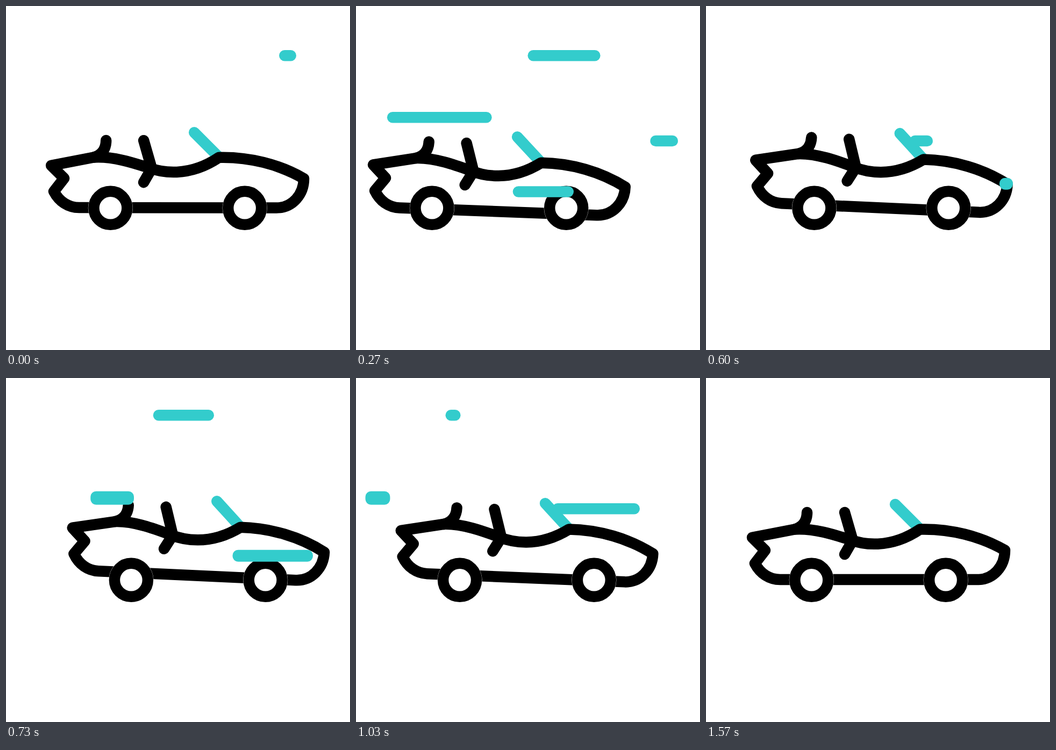
An HTML page for the animation above (1.67 s loop, 640 px wide and 640 px high).

```html
<!DOCTYPE html>
<html lang="en">
<head>
<meta charset="utf-8">
<title>Convertible</title>
<style>
  html, body { margin: 0; height: 100%; overflow: hidden; background: #fff; }
  svg { display: block; width: 100vw; height: 100vh; }
  path, circle { fill: none; stroke: #000; stroke-width: 20.5; stroke-linecap: round; stroke-linejoin: round; }
  .gap { fill: #fff; stroke: none; }
  .glass { stroke: #3cc; }
  rect { fill: #3cc; }
</style>
</head>
<body>
<svg viewBox="0 0 640 640">
  <g id="car">
    <g id="body">
      <path class="glass" d="M352 235L398 281"/>
      <path d="M86 296.8L165 281.5C200 279 240 292 268 301C290 309 341 320 398 281.5C454 280 510 294 556 320.5C556 350 535 375 505 375H138C118 375 101 364 91 345L110 320.5Z"/>
      <path d="M188 250C188 265 181 277 165 281.5"/>
      <path d="M258 250L273 302L258 328"/>
    </g>
    <g id="wheel">
      <circle class="gap" cx="196.3" cy="375.8" r="41.6"/>
      <circle cx="196.3" cy="375.8" r="31"/>
    </g>
    <use href="#wheel" x="249.8"/>
  </g>
  <g id="streaks"></g>
</svg>
<script>
const LOOP = 1670, STEP = 100 / 3, LAST_STEP = 47;
const CAP = 20.5, TRAVEL = 200, SWEEP = 8, LAG = 5.6;

// Keyframes are [step, value]
const shift = [[0, 0], [11, -59.5], [25, 41.5], [36, -20], [48, 0]];
const lift = [[14.5, 0], [24, -16.8], [27, -16.8], [41, 0]];
const tilt = [[0, 0], [12, 2.5], [23, 2.65], [30, 2.65], [41, 0]];

// Streaks: start step, right edge, centre y, height
const streaks = [
  [0, 540, 92.2, CAP], [2.4, 264, 207.2, CAP], [5.4, 405, 345.5, CAP], [7.2, 599, 251, CAP],
  [18.4, 571, 330.8, 22], [19.4, 387, 69.2, CAP], [20.3, 238, 223.3, 25], [27, 528, 243.2, CAP]
].map(([start, right, y, height]) => {
  const el = document.createElementNS("http://www.w3.org/2000/svg", "rect");
  const attrs = { y: y - height / 2, height, rx: 10.2 };
  for (const name in attrs) el.setAttribute(name, attrs[name]);
  document.getElementById("streaks").append(el);
  return { el, start, right };
});

const car = document.getElementById("car");
const body = document.getElementById("body");

function ease(u) {
  const v = Math.min(1, Math.max(0, u)) ** 0.93;
  return v * v * (3 - 2 * v);
}

function valueAt(keys, s) {
  let value = keys[0][1];
  for (let i = 1; i < keys.length; i++) {
    const [s0, v0] = keys[i - 1], [s1, v1] = keys[i];
    value += (v1 - v0) * ease((s - s0) / (s1 - s0));
  }
  return value;
}

function draw(ms) {
  const s = 1 + Math.min(LAST_STEP, Math.floor((ms % LOOP + 4) / STEP));
  car.setAttribute("transform", `translate(${valueAt(shift, s)} 0)`);
  body.setAttribute("transform", `translate(0 ${valueAt(lift, s)}) rotate(${valueAt(tilt, s)} 125 320)`);
  for (const { el, start, right } of streaks) {
    const head = ease((s - start) / SWEEP);
    const tail = ease((s - start - LAG) / SWEEP);
    const length = (head - tail) * TRAVEL;
    el.setAttribute("x", right - CAP - head * TRAVEL);
    el.setAttribute("width", length > 0.5 ? length + CAP : 0);
  }
}

let begin;
function tick(now) {
  begin ??= now;
  draw(now - begin);
  requestAnimationFrame(tick);
}
draw(0);
requestAnimationFrame(tick);
</script>
</body>
</html>
```
